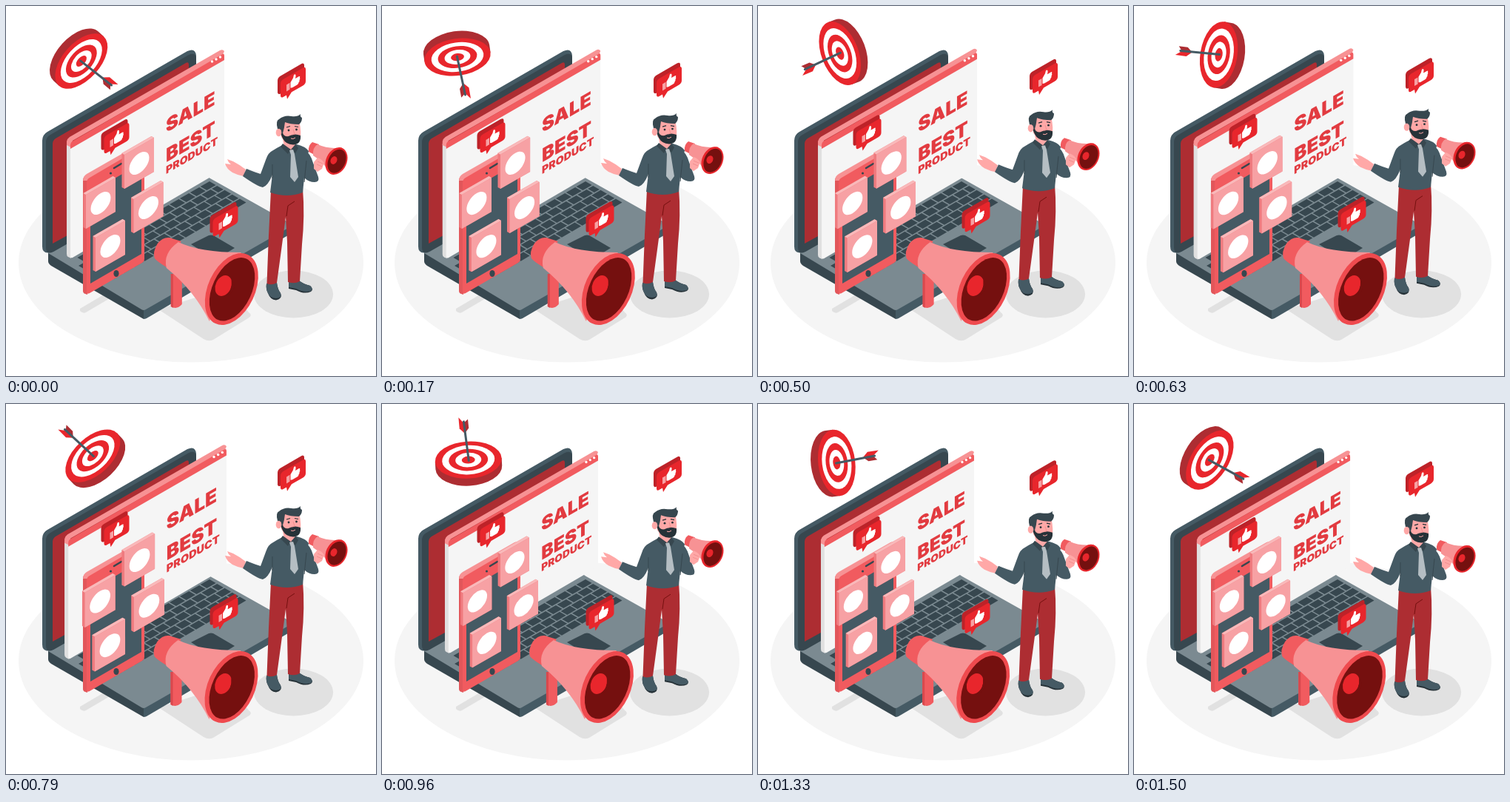
An HTML page that plays this animation: 500x500 px, repeating every 1.54 s.

```html
<!DOCTYPE html>
<html lang="en">
<head>
<meta charset="utf-8">
<title>Sale promotion</title>
<style>
  html, body { margin: 0; width: 100%; height: 100%; overflow: hidden; background: #fff; }
  svg { display: block; width: 100%; height: 100%; }
  text { font-family: Inter, Roboto, sans-serif; font-weight: 900; fill: #e23b40; }
  .slate { fill: #455a64; }
  .dark { fill: #37474f; }
  .grey { fill: #7b8a91; }
  .red { fill: #e8262c; }
  .coral { fill: #f15b5f; }
  .pink { fill: #f79294; }
  .wine { fill: #ad2d32; }
  .maroon { fill: #75100f; }
  .skin { fill: #ffa8a7; }
  .white { fill: #fff; }
</style>
</head>
<body>
<svg viewBox="0 0 500 500">
  <defs>
    <g id="icon">
      <path fill="#ef7b7f" d="M-3.5-2 36.5-25 40-23V23L0 46-3.5 44Z"/>
      <path fill="#f9b9ba" d="M-3.5-2 36.5-25 40-23 0 0Z"/>
      <path fill="#f7a1a4" d="M0 0 40-23V23L0 46Z"/>
      <circle class="white" r="13.5" transform="matrix(1 -.577 0 1 20 11.5)"/>
    </g>
    <g id="like">
      <g transform="matrix(1 -.577 0 1 -4 -4.3)" fill="#bd2228">
        <rect width="36" height="24" rx="4"/>
        <path d="M9 22 11 30 17 22Z"/>
      </g>
      <g transform="matrix(1 -.577 0 1 0 0)">
        <path class="red" d="M4 0H30Q34 0 34 4V20Q34 24 30 24H15L9 30 8 24H4Q0 24 0 20V4Q0 0 4 0Z"/>
        <rect x="8" y="10" width="4.5" height="9" fill="#f7a1a4"/>
        <path class="white" d="M13.5 10 17 6 18 2.5Q21 2 20.5 6L20 8.5H25Q27 9 26 11 27 12.500 25.500 14 26 16 24.500 16.500 24.500 18.500 22.500 18.500H16L13.500 17.500Z"/>
      </g>
    </g>
  </defs>

  <!-- floor and shadows -->
  <ellipse cx="250" cy="347" rx="233" ry="134.500" fill="#f5f5f5"/>
  <g fill="#e1e1e1">
    <ellipse cx="388.500" cy="389.500" rx="53.500" ry="32"/>
    <path d="M100 409 134 389 142 394 108 414Q104 416 100 412Z"/>
    <path d="M206 410 300 380 328 414Q334 418 327 422L280 451Q274 454 267 450Z"/>
  </g>

  <!-- laptop -->
  <path class="dark" d="M57 333 186 409V423L61 351Q57 348 57 345Z"/>
  <path class="slate" d="M186 409 386 294V307L190 422Q188 423 186 423Z"/>
  <path class="grey" d="M57 334 256 220 276 233 383 293Q388 296 383 299L189 410Q186 412 183 410Z"/>
  <path id="keys" class="dark" transform="matrix(-.866 .5 .866 .5 275 237)"/>
  <path class="dark" d="M250 322 274 310Q277 309 280 310L309 327 283 343Z"/>
  <path class="slate" d="M49 182Q49 174 56 170L245 61Q256 56 257 67V222L64 332Q49 337 49 325Z"/>
  <path class="dark" d="M54 184Q54 177 60 174L247 66Q256 62 257 70V222L64 332Q54 337 54 326Z"/>
  <path class="wine" d="M63 186Q63 182 67 179L243 77Q247 75 247 79V220L63 321Z"/>

  <!-- browser window -->
  <g id="window">
    <path fill="#e0e0e0" d="M82 186 88 190V341L84 339Q82 338 82 335Z"/>
    <path class="pink" d="M82 188V183Q83 179 86 177L289 60Q293 58 295 61L293 66 90 182 88 191Z"/>
    <path fill="#f5f5f5" d="M87 192 295 72V217Q295 220 292 222L90 340Q87 341 87 338Z"/>
    <path class="coral" d="M87 193V188Q87 184 91 182L291 66Q295 63 295 67V73L87 193Z"/>
    <g class="white">
      <circle cx="278.500" cy="75" r="1.700"/><circle cx="284" cy="72" r="1.700"/><circle cx="289.500" cy="69" r="1.700"/>
    </g>
    <g transform="matrix(1 -.577 0 1 216 171.500)">
      <text font-size="25.500">SALE</text>
      <text y="40" font-size="25.400">BEST</text>
      <text y="55.700" font-size="14.100">PRODUCT</text>
    </g>
  </g>

  <!-- phone -->
  <path fill="#e2565a" d="M104 233 110 235V390L107 389Q104 388 104 385Z"/>
  <path class="pink" d="M104 236Q104 230 109 227L179 187Q183 185 187 189L110 236Z"/>
  <path class="coral" d="M109 239Q109 234 113 232L183 191Q187 189 187 193V342Q187 345 184 347L113 388Q109 390 109 386Z"/>
  <path class="slate" d="M114 252 183 212V335L114 375Z"/>
  <path d="M146 219 156 213" stroke="#37474f" stroke-width="2.500" stroke-linecap="round"/>
  <circle class="dark" cx="141.500" cy="226" r="1.600"/>
  <ellipse class="dark" cx="149" cy="361.500" rx="3.600" ry="4.600"/>

  <g id="icons">
    <use href="#icon" x="160" y="201"/>
    <use href="#icon" x="108" y="255"/>
    <use href="#icon" x="172.500" y="261"/>
    <use href="#icon" x="121" y="313"/>
  </g>

  <g class="float"><use href="#like" x="132.500" y="176.500"/></g>
  <g class="float"><use href="#like" x="279.500" y="288.500"/></g>

  <!-- large megaphone -->
  <g id="horn">
    <path class="coral" d="M223 362H238V403Q231 411 223 406Z"/>
    <path fill="#d9484d" d="M223 362H226V408L223 406Z"/>
    <path class="coral" d="M237 318 221 313Q212 312 205 321 198 332 201 341 204 345 217 353Z"/>
    <path class="pink" d="M233 319Q262 333 318 333L275 426Q255 385 217 354 212 334 233 319Z"/>
    <g transform="translate(305 382.500) rotate(25)">
      <ellipse fill="#ef4a4e" rx="31.700" ry="51.400"/>
      <ellipse class="maroon" cx=".8" rx="26.500" ry="45.500"/>
    </g>
    <ellipse class="red" cx="294" cy="378" rx="10.500" ry="14.500" transform="rotate(25 294 378)"/>
    <path class="maroon" d="M297 391Q306 386 305 371 311 377 307 384 303 391 297 391Z"/>
  </g>

  <!-- presenter -->
  <g class="float">
    <path fill="#263238" d="M352 375 366 374Q367 383 371 388 374 396 365 397.500 357 397 354 388 351 383 352 375ZM382 373 396 371Q402 376 411 378 416 383 412 386 403 390 392 384L382 382Z"/>
    <path class="slate" d="M352 375 366 374Q367 383 371 388 374 394 365 395 357 395 354 388 351 383 352 375ZM382 373 396 371Q402 376 411 378 416 382 412 385 403 388 392 382L382 380Z"/>
    <path class="wine" d="M358 249 401 247Q404 283 400 322L397 372Q390 376 381 373L380 318 378 285 372 330 366 374Q359 378 352.500 375L355 310Z"/>
    <path d="M379 284 381 270 390 264" fill="none" stroke="#75100f"/>

    <path class="skin" d="M324 221Q315 214 307 210L299 207Q300 211 304 214L296 213Q298 220 306 225 314 229 321 230Z"/>
    <path class="slate" d="M403 195Q411 198 415 212L422 231Q424 238 417 238 409 238 403 232Z"/>
    <path class="slate" d="M361 195Q372 188 377 187L393 187Q405 190 409 196L404 222 401 252Q380 260 357 252L360 228Q354 243 347 245 340 244 320 230L325 220Q337 225 344 227L351 208Q354 198 361 195Z"/>
    <path d="M360 214V233M406 209 403 238" fill="none" stroke="#37474f"/>
    <path class="skin" d="M374 180 390 183 392 192 385 196 376 190Z"/>
    <path class="dark" d="M374 186 385 194 381 200 371 190ZM391 187 395 192 391 199 385 194Z"/>
    <path fill="#b5bec3" d="M383 195 388 194 390 200 395 231 390 238 384 231 385 201Z"/>

    <path class="skin" d="M371 157 396 155Q400 172 397 181 389 189 377 184L372 177Z"/>
    <path fill="#263238" d="M372 166 375 174Q379 178 384 175 391 172 398 175 399 187 388 187.500 378 187 374 179L370 170Z"/>
    <path class="dark" d="M367 166Q364 155 369 153 376 147 386 149 394 150 398 146 397 150 400 151 400 157 396 160 384 160 377 157 376 166 374 172L371 173Z"/>
    <ellipse class="skin" cx="368.500" cy="171" rx="3.800" ry="5.200"/>
    <g fill="#263238"><circle cx="382" cy="168" r="1.400"/><circle cx="392.500" cy="167" r="1.400"/></g>
    <path d="M379 164 384 162.500M390 162.500 395 163.500" stroke="#263238" stroke-width="1.200"/>
    <path d="M388 167 390 173 387 174" fill="none" stroke="#f28f8f"/>
    <path d="M385 179Q388 180.500 391 178" fill="none" stroke="#ffa8a7"/>

    <path class="coral" d="M423 187 414 184Q408 188 409 197L417 201Z"/>
    <path class="pink" d="M421 187Q437 194 454 191L437 226Q431 212 415 202 414 191 421 187Z"/>
    <g transform="translate(446.500 209.500) rotate(25)">
      <ellipse class="red" rx="14" ry="19.200"/>
      <ellipse class="maroon" cx=".6" rx="11.500" ry="16.800"/>
    </g>
    <ellipse class="red" cx="443" cy="208.500" rx="4.300" ry="5.600" transform="rotate(25 443 208.500)"/>
    <path class="skin" d="M416 211 421 205Q427 207 430 212L427 220 421 224 416 220Z"/>
    <path d="M421 210 428 213M420 214 427 217" stroke="#f28f8f"/>
  </g>
  <g class="float"><use href="#like" x="371" y="101"/></g>

  <!-- target, drawn with its arrow upright -->
  <g id="target">
    <path class="wine" d="M71.500 76V86A45 25 0 0 0 161.500 86V76Z"/>
    <g id="rings" transform="translate(116.500 76) scale(45 25)"></g>
    <path class="red" d="M113.700 40 107 33 106.500 18 113 26Z"/>
    <path class="wine" d="M113.700 40 119.500 33 119 21 113 26Z"/>
    <path d="M117 77 113.200 24" stroke="#455a64" stroke-width="3" stroke-linecap="round"/>
  </g>
</svg>
<script>
const LOOP = 1540;
const $ = id => document.getElementById(id);
const floaters = document.querySelectorAll('.float');

// [time, scale] pairs, linear between
const zoom = [[0, 1], [330, 1.005], [630, 1.013], [790, 1.028], [960, .972], [1500, .972], [1540, 1]];

function track(keys, t) {
  const i = keys.findIndex(k => k[0] > t);
  const [t0, v0] = keys[i - 1], [t1, v1] = keys[i];
  return v0 + (v1 - v0) * (t - t0) / (t1 - t0);
}

const scaleAbout = (s, x, y) => `translate(${x} ${y}) scale(${s}) translate(${-x} ${-y})`;

function drawKeys() {
  let d = '';
  for (let row = 0; row < 5; row++)
    for (let x = row % 2 * -6; x < 205; x += 16) {
      const left = Math.max(x, 0);
      d += `M${left} ${row * 11.8}H${x + 14.2}v10H${left}Z`;
    }
  $('keys').setAttribute('d', d);
}

function drawRings() {
  $('rings').innerHTML = [1, .79, .59, .39, .2]
    .map((r, i) => `<circle r="${r}" class="${i % 2 ? 'white' : 'red'}"/>`).join('');
}

function frame() {
  const t = performance.now() % LOOP;
  const turn = 2 * Math.PI * t / LOOP;
  const s = track(zoom, t);
  $('target').setAttribute('transform', `rotate(${360 * t / LOOP + 132} 109.5 72)`);
  $('window').setAttribute('transform', scaleAbout(s, 188, 200));
  $('icons').setAttribute('transform', scaleAbout(s, 160, 265));
  $('horn').setAttribute('transform', `translate(${1.2 * Math.sin(3 * turn) - .2} 0)`);
  const lift = `translate(0 ${-4 * (1 - Math.cos(turn))})`;
  floaters.forEach(el => el.setAttribute('transform', lift));
  requestAnimationFrame(frame);
}

drawKeys();
drawRings();
frame();
</script>
</body>
</html>
```
